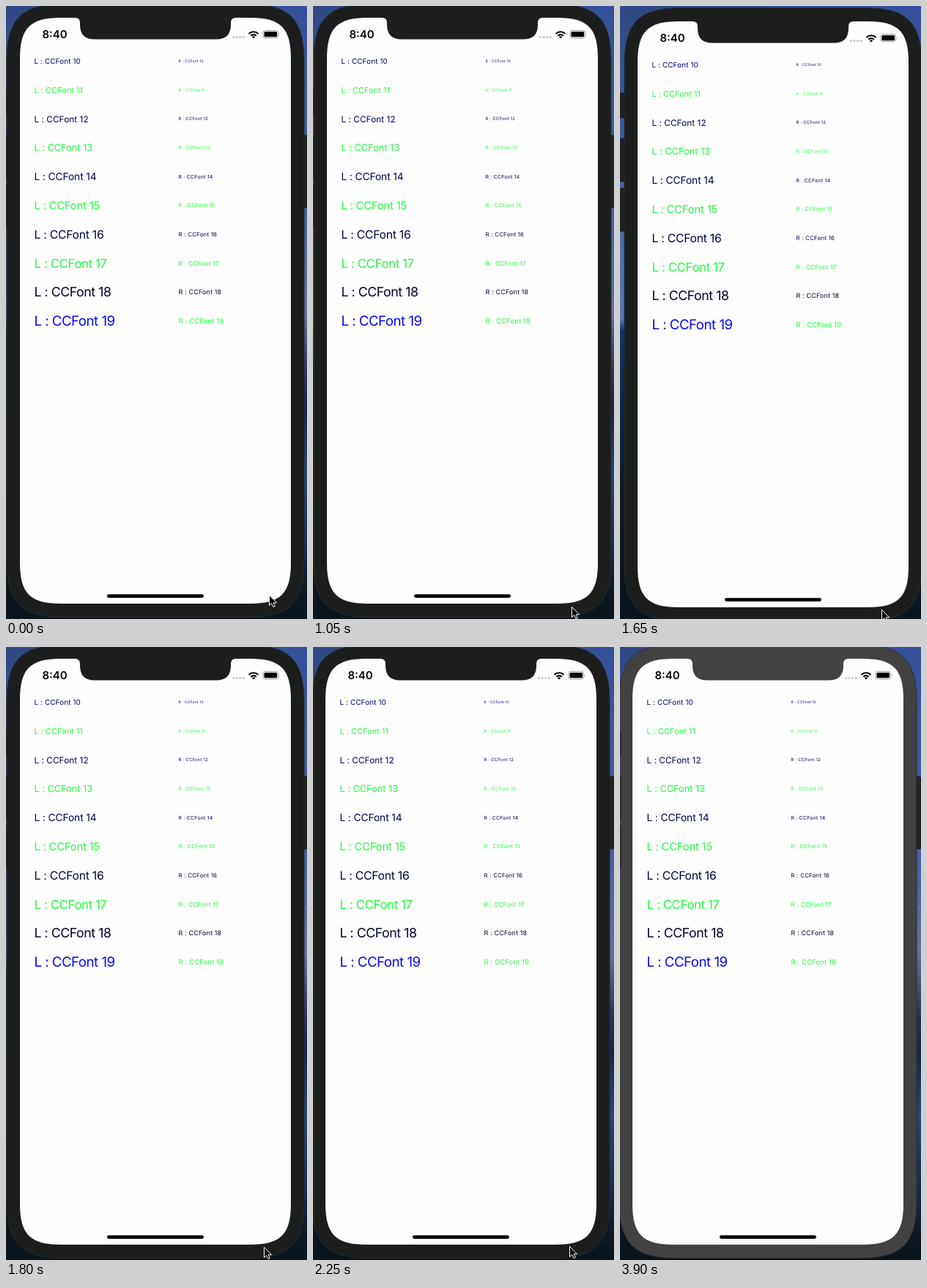
Animation, 411 px wide and 838 px high, one loop 4000 ms. Source, as an HTML page:

```html
<!DOCTYPE html>
<html lang="en">
<head>
<meta charset="utf-8">
<title>Font size demo</title>
<style>
  html, body { margin: 0; width: 100%; height: 100%; overflow: hidden; background: #0a141c; }
  svg { display: block; }
  text { font-family: Inter, "Liberation Sans", sans-serif; text-rendering: geometricPrecision; white-space: pre; }
</style>
</head>
<body>
<svg width="411" height="838" viewBox="0 0 411 838">
  <defs>
    <linearGradient id="skyLeft" x2="0" y2="1">
      <stop offset="0" stop-color="#2f4784"/>
      <stop offset=".2" stop-color="#3f5a9c"/>
      <stop offset=".51" stop-color="#5d79b6"/>
      <stop offset=".53" stop-color="#123462"/>
      <stop offset=".68" stop-color="#0a2448"/>
      <stop offset=".8" stop-color="#0b1822"/>
      <stop offset="1" stop-color="#0a141c"/>
    </linearGradient>
    <linearGradient id="skyRight" x2="0" y2="1">
      <stop offset="0" stop-color="#34509a"/>
      <stop offset=".35" stop-color="#4660a8"/>
      <stop offset=".5" stop-color="#64709f"/>
      <stop offset=".6" stop-color="#2a3358"/>
      <stop offset=".66" stop-color="#142548"/>
      <stop offset=".76" stop-color="#28467a"/>
      <stop offset=".88" stop-color="#162c50"/>
      <stop offset=".95" stop-color="#0c1a26"/>
      <stop offset="1" stop-color="#0a141c"/>
    </linearGradient>
  </defs>
  <rect width="206" height="838" fill="url(#skyLeft)"/>
  <rect x="205" width="206" height="838" fill="url(#skyRight)"/>
  <g id="stars" fill="#b9c8ee"></g>
  <g id="phone">
    <g id="buttons" fill="#202323" stroke="#111313" stroke-width=".8"></g>
    <path id="body" stroke="#2b2e2d" stroke-width="1"/>
    <g id="buttonCaps" fill="#1b1e1d" fill-opacity=".55"></g>
    <path id="screen" fill="#fefefe"/>
    <path id="notch" d="M75-1V0Q82 0 82 7V9.500Q82 29.500 102 29.500H268Q288 29.500 288 9.500V7Q288 0 295 0V-1Z"/>
    <text x="47.600" y="28.300" font-size="15" font-weight="600" text-anchor="middle" fill="#050505">8:40</text>
    <g id="signal" fill="#c4c4c6"></g>
    <g fill="none" stroke="#000" stroke-width="2.200">
      <path d="M312.600 21.900A9 9 0 0 1 325.400 21.900"/>
      <path d="M315.300 24.700A5.200 5.200 0 0 1 322.700 24.700"/>
    </g>
    <path d="M319 28.500L316.800 26.200A3.200 3.200 0 0 1 321.200 26.200Z"/>
    <rect x="332" y="17.500" width="20.600" height="10.300" rx="2.800" fill="none" stroke="#9d9d9f"/>
    <rect x="333.500" y="19" width="17.600" height="7.300" rx="1.500"/>
    <path d="M354 21V24.400Q355.400 22.700 354 21Z" fill="#9d9d9f"/>
    <g id="labels"></g>
    <rect x="119" y="788.300" width="132" height="4.600" rx="2.300"/>
  </g>
  <path id="pointer" d="M.5 .5V14.600L3.700 11.700L6 16.500L8.300 15.500L6.100 10.800H10.500Z" fill="#000" stroke="#fff" stroke-width="1"/>
</svg>
<script>
const LOOP = 4000;
const el = id => document.getElementById(id);

function add(parent, tag, attrs, content = "") {
  const node = document.createElementNS("http://www.w3.org/2000/svg", tag);
  for (const name in attrs) node.setAttribute(name, attrs[name]);
  node.textContent = content;
  el(parent).append(node);
}

// Rectangle with continuous corners: each curve spans `e`, `k` sets its fullness.
function smoothRect(x, y, w, h, e, k) {
  const r = x + w, b = y + h;
  return `M${x} ${y + e}C${x} ${y + k} ${x + k} ${y} ${x + e} ${y}H${r - e}` +
    `C${r - k} ${y} ${r} ${y + k} ${r} ${y + e}V${b - e}` +
    `C${r} ${b - k} ${r - k} ${b} ${r - e} ${b}H${x + e}` +
    `C${x + k} ${b} ${x} ${b - k} ${x} ${b - e}Z`;
}
el("screen").setAttribute("d", smoothRect(0, 0, 370, 801, 56, 14));
el("body").setAttribute("d", smoothRect(-18, -18.5, 406, 838, 78, 20));

for (const [x, y, h] of [[-24, 98, 34], [-24, 160, 59], [-24, 228, 59], [387, 161, 99]]) {
  add("buttons", "rect", { x, y, width: 6.5, height: h, rx: 1.5 });
  add("buttonCaps", "rect", { x: x < 0 ? -18 : 387, y, width: x < 0 ? 3.5 : 1.5, height: h });
}

let seed = 7;
const random = () => (seed = seed * 16807 % 2147483647) / 2147483647;
for (let i = 0; i < 36; i++) {
  const x = i % 2 ? random() * 18 : 393 + random() * 18;
  add("stars", "circle", { cx: x, cy: random() * 400, r: .3 + random() * .5, opacity: .6 });
}

for (let i = 0; i < 4; i++) add("signal", "circle", { cx: 291.4 + i * 4.6, cy: 26.5, r: 1.5 });

// Small sizes are set looser than large ones.
function label(side, n, x, y, points, fill) {
  const size = points * 370 / 375;
  const tracking = .088 - .0088 * points + .00014 * points ** 2;
  add("labels", "text", {
    x, y: y + size * .364, "font-size": size, "letter-spacing": size * tracking, fill
  }, `${side} : CCFont ${n}`);
}
for (let n = 10; n < 20; n++) {
  const y = 59.4 + (n - 10) * 39.45;
  const color = n % 2 ? "#1eff3c" : `rgb(0,0,${110 - (n - 10) * 8})`;
  label("L", n, 19.4, y, n, n === 19 ? "#0808f4" : color);
  label("R", n, 216.6, y, n / 2, color);
}

// Each entry: start time, x, y; a position holds until the next one.
const phoneMoves = [[0, 19, 16], [1200, 23, 21], [1350, 24, 21], [1800, 19, 16], [1950, 16, 14], [2250, 17, 16]];
const pointerMoves = [
  [0, 359, 805], [150, 351, 796], [300, 353, 799], [450, 363, 812], [600, 352, 820],
  [750, 351, 819], [1050, 353, 821], [1200, 356, 825], [1350, 356, 826], [1650, 357, 825],
  [1800, 352, 820], [1950, 349, 817], [2250, 350, 819], [2990, 347, 819], [3140, 336, 822],
  [3280, 348, 837], [3430, 348, 850]
];

function place(id, moves, time) {
  const [, x, y] = moves.findLast(move => move[0] <= time);
  el(id).setAttribute("transform", `translate(${x} ${y})`);
}

const start = performance.now();
function draw(now) {
  const time = Math.max(0, now - start) % LOOP;
  place("phone", phoneMoves, time);
  place("pointer", pointerMoves, time);
  const bezel = time < 3900 ? "#1b1e1d" : "#424242";
  el("body").setAttribute("fill", bezel);
  el("notch").setAttribute("fill", bezel);
  requestAnimationFrame(draw);
}
draw(start);
</script>
</body>
</html>
```
